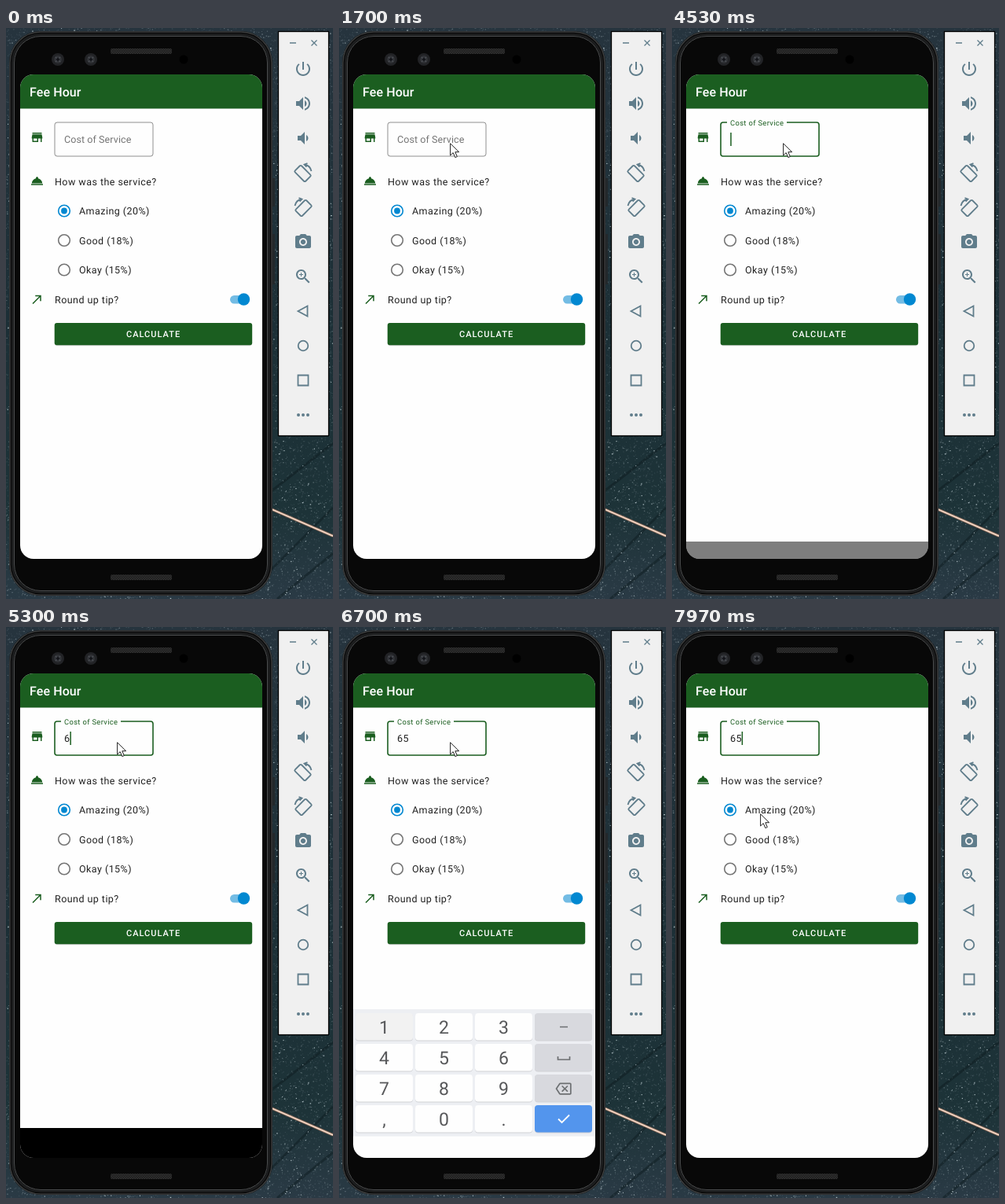
An HTML page that plays this animation: 416x726 px, repeating every 8 s.

```html
<!DOCTYPE html>
<html lang="en">
<head>
<meta charset="utf-8">
<title>Tip calculator</title>
<style>
html, body { margin: 0; height: 100%; overflow: hidden; background: #1b2f35; }
svg { display: block; width: 416px; height: 726px; font-family: Roboto, sans-serif; text-rendering: geometricPrecision; }
.body { font-size: 12.5px; letter-spacing: .45px; fill: #212121; }
.green { fill: #1b5e20; }
.tool { fill: #607d8b; }
.line { fill: none; stroke: #607d8b; stroke-width: 1.8; }
.digit { font-size: 23px; text-anchor: middle; fill: #202124; }
</style>
</head>
<body>
<svg viewBox="0 0 416 726">
  <defs>
    <clipPath id="glass"><rect x="18" y="59" width="308" height="616" rx="17"/></clipPath>
    <linearGradient id="wall" x2="0" y2="1">
      <stop stop-color="#26343e"/><stop offset=".5" stop-color="#1c2f36"/><stop offset=".85" stop-color="#1d3338"/><stop offset="1" stop-color="#2a3a45"/>
    </linearGradient>
    <pattern id="mesh" width="3" height="3" patternUnits="userSpaceOnUse">
      <path d="M0 0h3v3h-3z" fill="#1b1b1b"/><path d="M0 0h1.500v1.500h-1.500zM1.500 1.500h1.500v1.500h-1.500z" fill="#333"/>
    </pattern>
  </defs>

  <rect width="416" height="726" fill="url(#wall)"/>
  <path d="M336 590L416 528M336 690L416 610M345 726L416 668" stroke="#0e1c20" stroke-width="3" opacity=".5"/>
  <g id="specks" fill="none" stroke="#c3d2d6"></g>
  <path d="M336 611L416 646" stroke="#8d6a58" stroke-width="3.500"/>
  <path d="M336 611L416 646" stroke="#f3d9c8" stroke-width="1.700"/>

  <!-- phone -->
  <path d="M340 191v36M340 262v64" stroke="#23282b" stroke-width="4"/>
  <rect x="4" y="4" width="335" height="718" rx="40" fill="#080808"/>
  <g fill="none">
    <rect x="5" y="5" width="333" height="716" rx="39" stroke="#3c3e3f" stroke-width="1.500"/>
    <rect x="8.500" y="8.500" width="326" height="709" rx="35.500" stroke="#1c1d1e" stroke-width="3"/>
    <rect x="10.500" y="10.500" width="322" height="705" rx="33.500" stroke="#4a4c4d"/>
  </g>
  <g fill="url(#mesh)"><rect x="133" y="26" width="78" height="7" rx="2"/><rect x="133" y="695" width="78" height="7" rx="2"/></g>
  <g id="lenses"></g>
  <circle cx="226" cy="40" r="5.500" fill="#000"/>

  <!-- app -->
  <g clip-path="url(#glass)">
    <path d="M18 59h308v616H18z" fill="#fefefe"/>
    <path d="M18 59h308v43.500H18z" class="green"/>
    <text x="30" y="87" font-size="16" font-weight="500" letter-spacing=".1" fill="#fff">Fee Hour</text>
    <g class="green">
      <path transform="translate(30.500 130)scale(.75)" d="M20 4H4v2h16V4zm1 10v-2l-1-5H4l-1 5v2h1v6h10v-6h4v6h2v-6h1zm-9 4H6v-4h6v4z"/>
      <path transform="translate(30.500 185.500)scale(.75)" d="M2 17h20v2H2zm11.840-9.210c.1-.24.16-.51.16-.79 0-1.100-.9-2-2-2s-2 .9-2 2c0 .28.06.55.16.79C6.250 8.600 3.270 11.930 3 16h18c-.27-4.070-3.250-7.400-7.160-8.210z"/>
      <path transform="translate(30.500 336)scale(.75)" d="M9 5v2h6.590L4 18.590 5.410 20 17 8.410V15h2V5z"/>
    </g>
    <rect id="box" x="62" y="120" width="125" height="43" rx="3" fill="none"/>
    <rect id="gap" y="117" height="6" fill="#fefefe"/>
    <text id="label" x="74">Cost of Service</text>
    <text id="value" class="body" x="74" y="146"></text>
    <rect id="caret" y="133" width="1.500" height="17" class="green"/>
    <g class="body">
      <text x="62" y="199.500">How was the service?</text>
      <text x="93" y="237">Amazing (20%)</text>
      <text x="93" y="274.500">Good (18%)</text>
      <text x="93" y="312">Okay (15%)</text>
      <text x="62" y="349.500">Round up tip?</text>
    </g>
    <g fill="none" stroke="#757575" stroke-width="1.600">
      <circle cx="74" cy="232.500" r="7.300" stroke="#0288d1"/>
      <circle cx="74" cy="270" r="7.300"/>
      <circle cx="74" cy="307.500" r="7.300"/>
    </g>
    <circle cx="74" cy="232.500" r="3.900" fill="#0288d1"/>
    <rect x="285" y="340" width="24" height="10.500" rx="5.250" fill="#73bce4"/>
    <circle cx="302.500" cy="345" r="7.700" fill="#0288d1"/>
    <rect x="62" y="376" width="251" height="28.300" rx="3" opacity=".15"/>
    <rect x="61.700" y="375" width="251.500" height="28.300" rx="3" class="green"/>
    <text x="153" y="393" font-size="11" font-weight="500" letter-spacing="1" fill="#fff">CALCULATE</text>
    <rect id="scrim" x="18" width="308" height="60"/>
    <g id="keys"></g>
  </g>

  <!-- emulator controls -->
  <rect x="346.500" y="4.500" width="64" height="514" fill="#f0f0f0" stroke="#000" stroke-width="1.300"/>
  <path d="M361 19h8M388.500 15.500l7 7m0-7l-7 7" class="line" style="stroke-width:1.300"/>
  <g id="tools" class="tool"></g>
  <path d="M371.500 360l12-6.500v13zM371.500 441.500h13v13h-13z" class="line"/>
  <circle cx="378" cy="404" r="6.300" class="line"/>
  <g class="tool"><circle cx="372" cy="492" r="2"/><circle cx="378" cy="492" r="2"/><circle cx="384" cy="492" r="2"/></g>

  <path id="mouse" d="M.6 .8V16l3.600-3.400 2.600 6 2.500-1.100-2.500-5.800h4.800z" fill="#fff" stroke="#222" stroke-width="1"/>
</svg>
<script>
const $ = id => document.getElementById(id);
const set = (id, attrs) => { for (const k in attrs) $(id).setAttribute(k, attrs[k]); };
const ramp = (t, a, b) => Math.max(0, Math.min(1, (t - a) / (b - a)));
const mix = (a, b, p) => a + (b - a) * p;

// wallpaper specks, faint and many to bright and few, only around the phone
let seed = 7;
const rnd = () => (seed = seed * 16807 % 2147483647) / 2147483647;
$('specks').innerHTML = [.13, .35, .85].map((alpha, i) => {
  let d = '';
  for (let n = 0; n < 14000 / 3.5 ** i; n++) {
    const x = rnd() * 416, y = rnd() * 726;
    if (x < 18 || x > 325 || y < 18 || y > 708) d += `M${x.toFixed(1)} ${y.toFixed(1)}h${(.6 + rnd()).toFixed(1)}`;
  }
  return `<path d="${d}" opacity="${alpha}" stroke-width="1.200"/>`;
}).join('');

$('lenses').innerHTML = [66, 108].map(x =>
  `<circle cx="${x}" cy="40" r="8" fill="#222326"/><circle cx="${x}" cy="40" r="5" fill="#303236"/>
   <path d="M${x - 3} 37l6 6m0-6l-6 6" stroke="#4c4f55" stroke-width="1.500"/><circle cx="${x}" cy="40" r="2" fill="#14151a"/>`).join('');

const turn = `<rect x="-9.500" y="-5.800" width="19" height="11.600" rx="1.500" transform="translate(-.5 1)rotate(45)" class="line"/>
  <path d="M10.500-2A11 11 0 0 0 2-10.500M5.500-12L1.500-10.500 4.500-7.500" class="line"/>`;
const shape = d => `<path transform="translate(-12 -12)" d="${d}"/>`;
const icons = [
  shape('M13 3h-2v10h2V3zm4.830 2.170l-1.420 1.420C17.990 7.860 19 9.810 19 12c0 3.870-3.130 7-7 7s-7-3.130-7-7c0-2.190 1.010-4.140 2.580-5.420L6.170 5.170C4.230 6.820 3 9.260 3 12c0 4.970 4.030 9 9 9s9-4.030 9-9c0-2.740-1.230-5.180-3.170-6.830z'),
  shape('M3 9v6h4l5 5V4L7 9H3zm13.500 3c0-1.770-1.020-3.290-2.500-4.030v8.050c1.480-.73 2.500-2.250 2.500-4.020zM14 3.230v2.060c2.890.86 5 3.540 5 6.710s-2.110 5.850-5 6.710v2.060c4.010-.91 7-4.490 7-8.770s-2.990-7.860-7-8.770z'),
  shape('M18.500 12c0-1.770-1.020-3.290-2.500-4.030v8.050c1.480-.73 2.500-2.250 2.500-4.020zM5 9v6h4l5 5V4L9 9H5z'),
  turn, `<g transform="scale(-1 1)">${turn}</g>`,
  shape('M9 2L7.170 4H4c-1.100 0-2 .9-2 2v12c0 1.100.9 2 2 2h16c1.100 0 2-.9 2-2V6c0-1.100-.9-2-2-2h-3.170L15 2H9zm3 15c-2.760 0-5-2.240-5-5s2.240-5 5-5 5 2.240 5 5-2.240 5-5 5zm0-8.200a3.200 3.200 0 1 0 .01 0z'),
  shape('M15.500 14h-.79l-.28-.27C15.410 12.590 16 11.110 16 9.500 16 5.910 13.090 3 9.500 3S3 5.910 3 9.500 5.910 16 9.500 16c1.610 0 3.090-.59 4.230-1.570l.27.28v.79l5 4.990L20.490 19l-4.990-5zm-6 0C7.010 14 5 11.990 5 9.500S7.010 5 9.500 5 14 7.010 14 9.500 11.990 14 9.500 14zM12 10h-2v2H9v-2H7V9h2V7h1v2h2v1z')
];
$('tools').innerHTML = icons.map((icon, i) => `<g transform="translate(378 ${52 + i * 44})">${icon}</g>`).join('');

// keypad
const caps = '123 456 789 ,0. ';
$('keys').innerHTML = '<path d="M18 476h308v161.500H18z" fill="#e8eaf0"/>' + [...caps].map((c, i) => {
  const x = 21 + i % 4 * 76, y = 481 + (i >> 2) * 39;
  const fill = i == 15 ? '#1a73e8' : c == ' ' ? '#cccdd4' : '#fefefe';
  return `<rect x="${x}" y="${y + 1}" width="73" height="34.500" rx="4" fill="#c3c5ca"/>
    <rect id="key${i}" x="${x}" y="${y}" width="73" height="34.500" rx="4" fill="${fill}"/>
    <text class="digit" x="${x + 36.5}" y="${y + 26}">${c}</text>`;
}).join('') +
  `<path d="M281 498.500h10M278.500 536v4h15v-4" fill="none" stroke="#3c4043" stroke-width="1.700"/>
   <path transform="translate(275.500 567)scale(.84)" fill="#3c4043" d="M22 3H7c-.69 0-1.230.35-1.590.88L0 12l5.410 8.110c.36.53.9.89 1.590.89h15c1.100 0 2-.9 2-2V5c0-1.100-.9-2-2-2zm0 16H7.070L2.400 12l4.660-7H22v14zm-11.590-2L14 13.410 17.590 17 19 15.590 15.410 12 19 8.410 17.590 7 14 10.590 10.410 7 9 8.410 12.590 12 9 15.590z"/>
   <path d="M279 615.500l4.500 4.500 9.500-9.500" fill="none" stroke="#fff" stroke-width="1.800"/>`;

// pointer: start, end, x, y reached at the end
const moves = [[500, 870, 202, 386], [1000, 1100, 202, 389], [1270, 1700, 141, 146], [7500, 7970, 112, 237]];
const blinks = [3270, 3770, 4270, 4770, 5300, 5800, 5870, 6370, 6870, 7370, 7870];

function draw(t) {
  let x = 22, y = 355;
  for (const [a, b, toX, toY] of moves) {
    const u = ramp(t, a, b), p = u * u * (3 - 2 * u);
    x = mix(x, toX, p);
    y = mix(y, toY, p);
  }
  set('mouse', { transform: `translate(${x} ${y})`, opacity: +(t >= 500) });

  const focus = t >= 3100, up = ramp(t, 3070, 3270);
  set('box', { stroke: focus ? '#1b5e20' : '#8f8f8f', 'stroke-width': focus ? 1.6 : 1 });
  set('gap', { x: mix(108, 70, up), width: 76 * up });
  set('label', {
    y: mix(145.5, 124, up), 'font-size': mix(12.5, 9.4, up),
    'letter-spacing': mix(.08, .35, up), fill: focus ? '#1b5e20' : '#757575'
  });
  const typed = t < 5300 ? '' : t < 5870 ? '6' : '65';
  $('value').textContent = typed;
  set('caret', { x: 74.2 + typed.length * 7.2, opacity: blinks.filter(b => t >= b).length % 2 });

  const rise = 1 - (1 - ramp(t, 4500, 4602)) ** 2;
  set('scrim', { y: 637 + 32 * (1 - rise), opacity: t < 5570 ? rise : 0 });

  const fade = ramp(t, 6640, 6880);
  set('keys', { opacity: t < 5570 ? 0 : 1 - fade, transform: `translate(0 ${40 * fade})` });
  set('key0', { fill: t < 6070 ? '#fefefe' : t < 6100 ? '#f6f6f6' : '#eee' });
}

// 30 pictures a second, times rounded to 10 ms
const start = performance.now();
function loop() {
  const t = (performance.now() - start) % 8000;
  draw(Math.round(Math.floor((t + 4) * .03) / .3) * 10);
  requestAnimationFrame(loop);
}
loop();
</script>
</body>
</html>
```
